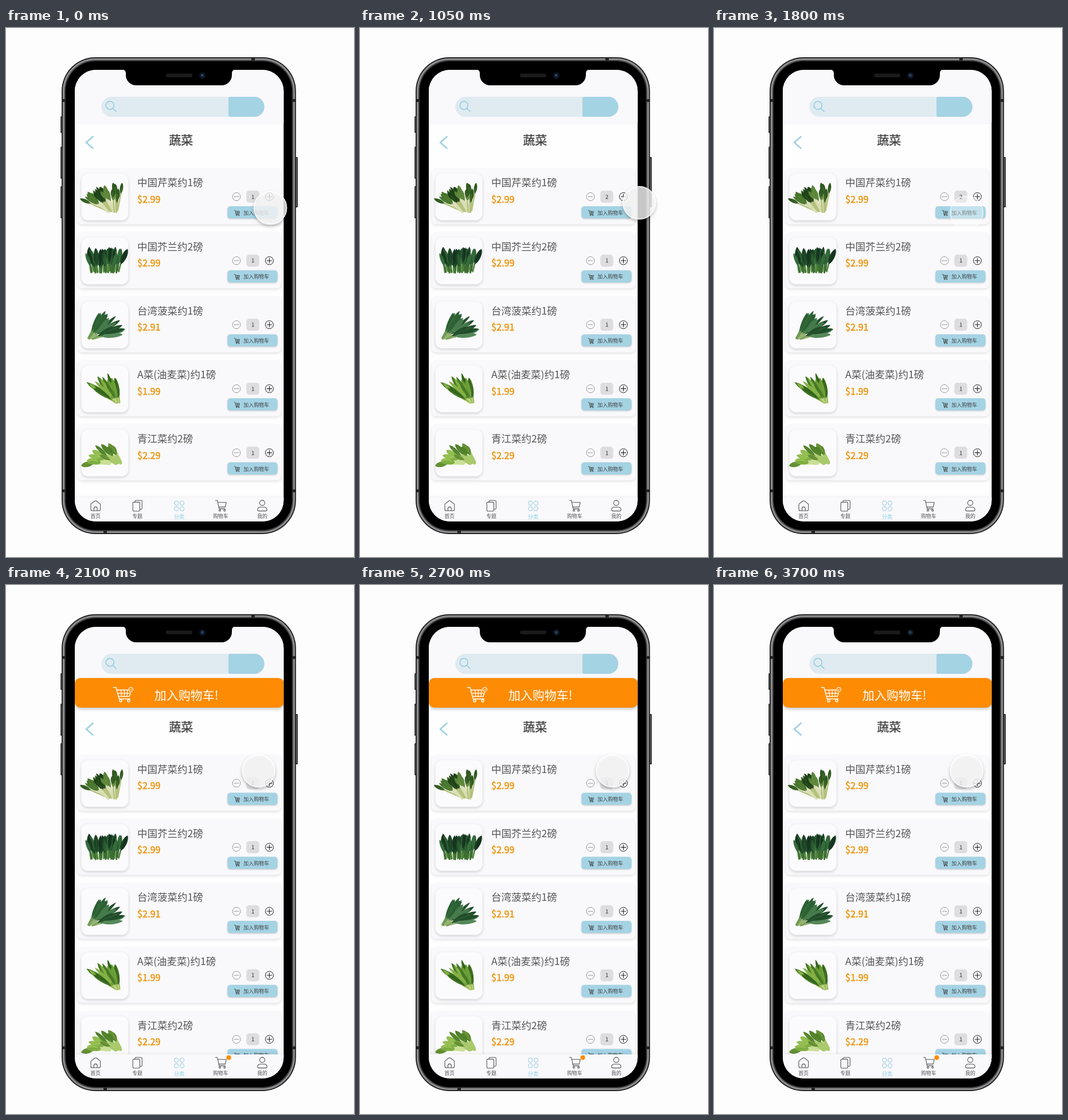
An HTML page for the animation above (3750 ms loop, 607 by 923 pixels).

```html
<!DOCTYPE html>
<html lang="zh-CN">
<head>
<meta charset="utf-8">
<title>蔬菜</title>
<style>
html, body { margin: 0; width: 100%; height: 100%; overflow: hidden; background: #fefdfe; }
svg { display: block; width: 607px; height: 923px; }
text { font-family: "Noto Sans CJK SC", "Noto Sans CJK", "Noto Sans", sans-serif; fill: #555; }
.mid { text-anchor: middle; }
.price { fill: #ec950c; stroke: #ec950c; stroke-width: .5px; }
.title { fill: #444; stroke: #444; stroke-width: .4px; }
.qty { stroke: #555; stroke-width: .25px; }
.line { fill: none; stroke: #555; stroke-width: 1.1; stroke-linecap: round; stroke-linejoin: round; }
.card { filter: drop-shadow(0 2.5px 2px rgba(0, 0, 0, .11)); }
.thumb { filter: drop-shadow(0 2px 2.5px rgba(0, 0, 0, .16)); }
.btn { filter: drop-shadow(0 1.5px 1.2px rgba(0, 0, 0, .2)); }
.soft { filter: drop-shadow(0 1px 2px rgba(0, 0, 0, .05)); }
.banner { filter: drop-shadow(0 3px 2.5px rgba(0, 0, 0, .2)); }
</style>
</head>
<body>
<svg id="stage" viewBox="0 0 607 923"></svg>
<script>
const LOOP = 3750, PUSH = 51.6, PITCH = 111.7;
const BLUE = '#a4d3e4', ORANGE = '#fd8b03';
const stage = document.getElementById('stage');

// Seeded random numbers
let seed = 7;
const rand = (a = 0, b = 1) => {
  seed = (seed * 16807) % 2147483647;
  return a + (b - a) * seed / 2147483647;
};

const rect = (x, y, w, h, r, fill, extra = '') =>
  `<rect x="${x}" y="${y}" width="${w}" height="${h}" rx="${r}" fill="${fill}" ${extra}/>`;
const circle = (x, y, r, extra = '') => `<circle cx="${x}" cy="${y}" r="${r}" ${extra}/>`;
const path = (d, extra = '') => `<path d="${d}" ${extra}/>`;
const text = (x, y, size, str, extra = '') =>
  `<text x="${x}" y="${y}" font-size="${size}" ${extra}>${str}</text>`;

function leaf(x, y, angle, len, width, fill) {
  const c = Math.cos(angle), s = Math.sin(angle);
  const at = (u, v) => `${(x + u * c - v * s).toFixed(1)} ${(y + u * s + v * c).toFixed(1)}`;
  return path(`M${at(0, 0)}C${at(len * .25, -width)} ${at(len * .8, -width)} ${at(len, 0)}` +
    `C${at(len * .8, width)} ${at(len * .25, width)} ${at(0, 0)}Z`, `fill="${fill}"`);
}

// A bunch of stalks that start near (x, y) and open between two angles
function bunch({ x, y, spread, from, to, len, width, stem, stemColor, stemWidth, greens, count }) {
  let stalks = '', leaves = '';
  for (let i = 0; i < count; i++) {
    const t = (i * 7 % count) / (count - 1);
    const a = (from + (to - from) * t + rand(-6, 6)) * Math.PI / 180;
    const l = (len[0] + (len[1] - len[0]) * t) * rand(.7, 1.04);
    const bx = x + (t - .5) * spread + rand(-2, 2), by = y + rand(-3, 2);
    const part = stem * rand(.75, 1.25);
    const mx = bx + Math.cos(a) * l * part, my = by + Math.sin(a) * l * part;
    const ex = bx + Math.cos(a) * l * .82, ey = by + Math.sin(a) * l * .82;
    stalks += path(`M${bx} ${by}L${mx} ${my}`,
      `stroke="${stemColor[i % 2]}" stroke-width="${stemWidth}" stroke-linecap="round"`);
    leaves += leaf(mx, my, a + rand(-.2, .2), l * (1 - part), width * rand(.75, 1.2), greens[i % greens.length]) +
      path(`M${mx} ${my}L${ex} ${ey}`, `stroke="${stemColor[0]}" stroke-width=".5" opacity=".5"`);
  }
  return stalks + leaves;
}

// Coordinates of each bunch are measured from the top of its card
const items = [
  { name: '中国芹菜约1磅', price: '$2.99', veg: { x: 185, y: 75, spread: 20, from: -150, to: -84,
    len: [49, 49], width: 4.6, stem: .52, stemColor: ['#b4c27c', '#d9deb4'], stemWidth: 2.6,
    greens: ['#2f5a20', '#47752c', '#1f4218', '#5b8539'], count: 29 } },
  { name: '中国芥兰约2磅', price: '$2.99', veg: { x: 173, y: 69, spread: 46, from: -100, to: -80,
    len: [43, 43], width: 5, stem: .3, stemColor: ['#4f8439', '#3c6d32'], stemWidth: 2.6,
    greens: ['#1b4326', '#29592f', '#143420', '#346b3a'], count: 36 } },
  { name: '台湾菠菜约1磅', price: '$2.91', veg: { x: 149, y: 73, spread: 12, from: -66, to: -10,
    len: [58, 55], width: 4.8, stem: .28, stemColor: ['#6f9c52', '#98b276'], stemWidth: 1.7,
    greens: ['#2b6034', '#44794a', '#214d2b', '#55885a'], count: 27 } },
  { name: 'A菜(油麦菜)约1磅', price: '$1.99', veg: { x: 193, y: 72, spread: 9, from: -154, to: -98,
    len: [62, 44], width: 4.8, stem: .2, stemColor: ['#9bbd5b', '#c3d68c'], stemWidth: 2.8,
    greens: ['#477a25', '#6a9c35', '#33651d', '#82b044'], count: 25 } },
  { name: '青江菜约2磅', price: '$2.29', veg: { x: 187, y: 66, spread: 26, from: -184, to: -116,
    len: [41, 46], width: 5.4, stem: .42, stemColor: ['#a9c96c', '#cadf97'], stemWidth: 5.5,
    greens: ['#648f33', '#7dac40', '#4f8129', '#93be50'], count: 15 } }
];

// Cart in a box about 20 wide
const cart = (x, y, k, color, width) =>
  `<g transform="translate(${x} ${y}) scale(${k})" fill="none" stroke="${color}" stroke-width="${width / k}"
    stroke-linejoin="round" stroke-linecap="round">` +
  path('M0 0.5H3.5L6.7 15.5H17.5') + path('M4.2 4H19.5L17.6 12.5H6') +
  circle(8, 18.6, 1.5) + circle(16.4, 18.6, 1.5) + '</g>';

function card(item, i) {
  const ring = (x, color) => circle(x, 49.3, 7, `fill="none" stroke="${color}" stroke-width="1"`);
  return `<g transform="translate(0 ${245 + i * PITCH})">` +
    rect(125, 0, 355.5, 97.5, 8, '#f9f8fa', 'class="card"') +
    rect(131.5, 9, 82, 81.5, 12, '#fbfafc', 'class="thumb"') +
    bunch(item.veg) +
    text(229, 31.3, 17.5, item.name) +
    text(229, 59.8, 16.2, item.price, 'class="price"') +
    ring(402, '#999') + path('M397.5 49.3h9', 'stroke="#999"') +
    rect(419.3, 38.8, 22.4, 21, 5, '#dddcdf') +
    text(430.6, 52.8, 9.5, '1', `class="mid qty" id="qty${i}"`) +
    ring(459.4, '#222') + path('M454.8 49.3h9.2M459.4 44.7v9.2', 'stroke="#222" stroke-width="1.1"') +
    rect(386.3, 66, 87.2, 21.2, 5, BLUE, 'class="btn"') +
    cart(398.3, 73, .47, '#444', .9) + path('M401.5 76.9h5.2M404 75v3.8', 'stroke="#444" stroke-width=".8"') +
    text(414.3, 80.8, 8.95, '加入购物车', 'style="fill:#444"') + '</g>';
}

function phone() {
  const key = (x, y, h) => rect(x, y, 4, h, 1.5, '#333') + rect(x + 1.3, y + 2, 1, h - 4, .5, '#777');
  const shell = (d, fill) => rect(97 + d, 51 + d, 408.8 - 2 * d, 832 - 2 * d, 59 - d, fill);
  const rim = [[0, '#161617'], [1.4, '#58585a'], [2.3, '#9a9a9c'], [3.8, '#7c7c7e'],
    [5, '#4c4c4e'], [6.2, '#262628'], [7.2, '#000']];
  const bands = [[428, 51.5, 6, 5.5], [170, 877, 6, 5.5], [97, 124, 6, 5], [499.6, 124, 6, 5],
    [97, 805, 6, 5], [499.6, 805, 6, 5]];
  return key(95, 154, 29) + key(95, 207, 56) + key(95, 276, 56) + key(505, 225, 88) +
    rim.map(r => shell(...r)).join('') + bands.map(b => rect(...b, 0, '#222')).join('');
}

const notch = path('M203 72.5Q209 73 209 79V82A18 18 0 0 0 227 100H376A18 18 0 0 0 394 82V79Q394 73 400 72.5Z') +
  rect(279, 79.5, 46, 6.5, 3.2, '#1b1b1c') +
  circle(342.5, 82.8, 5.6, 'fill="#0e1622"') + circle(342.5, 82.8, 2.6, 'fill="#1d3550"') +
  circle(341.6, 81.9, 1, 'fill="#4b6d92"');

const header = rect(119, 72, 367, 93, 0, '#f9f8fb', 'class="soft"') +
  rect(166.3, 120, 284.4, 35, 17.5, '#dfebf1') +
  path('M391 120H433.2A17.5 17.5 0 0 1 433.2 155H391Q388 155 388 152V123Q388 120 391 120Z', `fill="${BLUE}"`) +
  circle(181.3, 135, 7, 'fill="none" stroke="#8ecbe0" stroke-width="1.5"') +
  path('M186.4 140.2L192 145.8', 'stroke="#8ecbe0" stroke-width="1.6" stroke-linecap="round"');

const banner = rect(119.8, 162.3, 365, 51.6, 10, ORANGE, 'class="banner"') +
  '<g fill="none" stroke="#fff" stroke-width="1.5" stroke-linecap="round" stroke-linejoin="round">' +
  path('M187.5 178.8H192L197.4 198.8H216.5M193.3 183.2H213M217.4 188L215 194.6H196.4') +
  path('M194.8 188.9H217M200.6 183.2L201.6 194.6M206.4 183.2V194.6M212 183.2L211 194.6', 'stroke-width="1.2"') +
  circle(200, 201.9, 2) + circle(214, 201.9, 2) +
  circle(217.8, 182.2, 3.6, 'stroke-width="1.1"') + path('M216.2 182.2l1.3 1.2 2.2-2.4', 'stroke-width=".9"') + '</g>' +
  text(258.8, 199.6, 21, '加入购物车!', 'font-weight="300" style="fill:#fff"');

const label = (x, str) => text(x, 855, 8.9, str, 'class="mid"');
const nav = rect(119, 819, 367, 46, 0, '#f9f8fb', 'style="filter:drop-shadow(0 -1.5px 2px rgba(0,0,0,.05))"') +
  '<g class="line">' +
  path('M148 830.6L155 825.2Q156.3 824.4 157.6 825.2L164.6 830.6V840Q164.6 842.3 162.3 842.3H150.3Q148 842.3 148 840Z') +
  path('M153.4 842V838.5A2.9 2.9 0 0 1 159.2 838.5V842') +
  path('M225 827.4V826Q225 824.3 226.7 824.3H235.6Q237.3 824.3 237.3 826V838Q237.3 839.8 235.6 839.8H233.4') +
  rect(221.2, 827.4, 12.2, 15.6, 1.7, 'none') +
  circle(447, 828.6, 4.5) +
  path('M443 836H451Q455 836.6 455.2 840.5Q455.2 842.6 453 842.6H441Q438.8 842.6 438.8 840.5Q439 836.6 443 836Z') +
  '</g>' + cart(365.3, 823.8, .97, '#555', 1.1) +
  [[297.3, 829], [307, 829], [297.3, 838.7], [307, 838.7]]
    .map(p => circle(...p, 3.6, `fill="none" stroke="${BLUE}" stroke-width="1.2"`)).join('') +
  label(156, '首页') + label(229, '专题') + label(374.3, '购物车') + label(447, '我的') +
  text(302, 856, 9.3, '分类', 'class="mid" style="fill:#8fd0e6"') +
  circle(388.5, 824.6, 4.1, `id="dot" fill="${ORANGE}"`);

stage.innerHTML =
  '<defs><clipPath id="screen"><rect x="120" y="73" width="364.3" height="788" rx="37"/></clipPath>' +
  '<clipPath id="below"><rect x="100" y="162" width="400" height="80"/></clipPath></defs>' +
  phone() + '<g clip-path="url(#screen)">' + rect(119, 72, 367, 790, 0, '#fefefe') +
  '<g id="page">' +
  path('M152.3 189L140 199.8L152.3 210.6', 'fill="none" stroke="#9fd0e3" stroke-width="2.6"') +
  text(305.2, 203, 21, '蔬菜', 'class="mid title"') +
  items.map(card).join('') + '</g>' +
  header + `<g clip-path="url(#below)"><g id="banner">${banner}</g></g>` + nav + '</g>' + notch +
  circle(0, 0, 28.6, 'id="touch" fill="#fff" stroke="#fff" stroke-width="1.5"');

const get = id => document.getElementById(id);
const page = get('page'), bar = get('banner'), dot = get('dot'), qty = get('qty0'), touch = get('touch');

const ease = u => u * u * (3 - 2 * u);
const ramp = (t, a, b) => ease(Math.min(1, Math.max(0, (t - a) / (b - a))));

// Value along keys of [time, value], eased between neighbours
function track(t, keys) {
  let v = keys[0][1];
  for (let i = 1; i < keys.length; i++) {
    v += (keys[i][1] - keys[i - 1][1]) * ramp(t, keys[i - 1][0], keys[i][0]);
  }
  return v;
}

const trackX = [[0, 461], [350, 459.5], [680, 459.5], [1050, 487], [1130, 489], [1600, 440.6]];
const trackY = [[0, 314], [350, 296], [680, 296], [1050, 305], [1150, 305], [1600, 322], [1850, 322], [2050, 324]];
const trackPress = [[400, 0], [500, 1], [600, 1], [700, 0], [1640, 0], [1750, 1], [1850, 1], [1980, 0]];

function draw(t) {
  const x = track(t, trackX), y = track(t, trackY), press = track(t, trackPress);
  const push = ramp(t, 1830, 2050);
  page.setAttribute('transform', `translate(0 ${push * PUSH})`);
  bar.setAttribute('transform', `translate(0 ${(push - 1) * (PUSH + 8)})`);
  dot.setAttribute('opacity', push);
  qty.textContent = t >= 580 && t < 1850 ? '2' : '1';
  touch.setAttribute('transform', `translate(${x} ${y})`);
  touch.setAttribute('fill-opacity', .78 - .43 * press);
  touch.setAttribute('stroke-opacity', .95 - .25 * press);
  touch.style.filter = `drop-shadow(0 3px 2.5px rgba(0,0,0,${.28 * (1 - press)}))`;
}

function tick(now) {
  draw(now % LOOP);
  requestAnimationFrame(tick);
}
draw(0);
requestAnimationFrame(tick);
</script>
</body>
</html>
```
